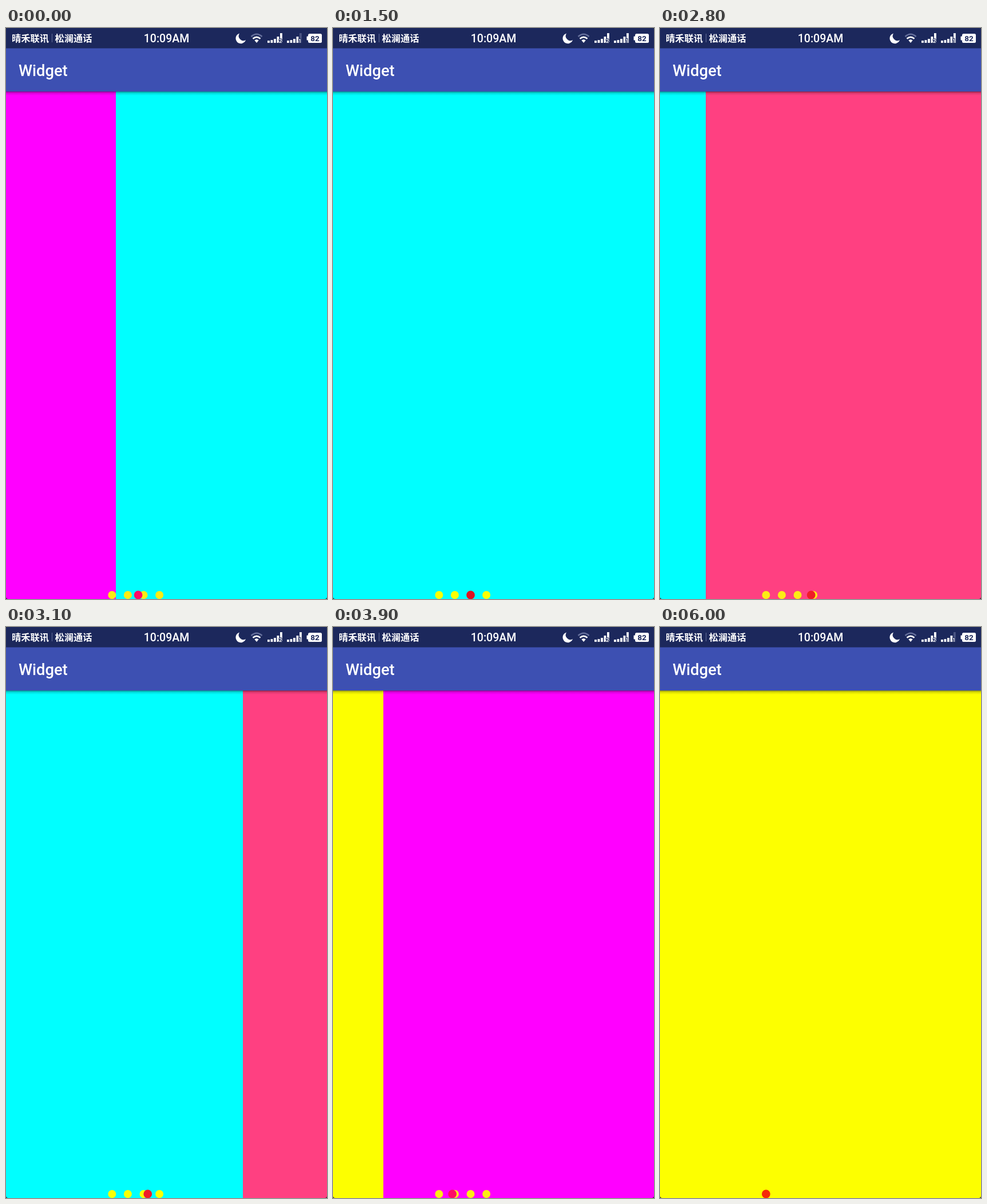
These frames come from a looping animation (561x998 px, 6100 ms). An HTML page:

```html
<!DOCTYPE html>
<html lang="zh">
<head>
<meta charset="utf-8">
<style>
  html, body { margin: 0; width: 100%; height: 100%; overflow: hidden; background: #222; }
  svg { display: block; width: 561px; height: 998px; border-radius: 4px; }
  text { font-family: Roboto, "Noto Sans CJK SC", "Noto Sans CJK", sans-serif; font-weight: 500; fill: #fff; }
  .carrier { font-family: "Noto Sans CJK SC", "Noto Sans CJK", sans-serif; font-size: 16.25px; font-weight: 700; }
  .sim { font-size: 9px; font-weight: 700; stroke: #1c285c; stroke-width: 2px; paint-order: stroke; }
</style>
</head>
<body>
<svg viewBox="0 0 561 998">
  <defs>
    <linearGradient id="shade" x2="0" y2="1">
      <stop stop-color="#000" stop-opacity=".45"/>
      <stop offset=".4" stop-color="#000" stop-opacity=".14"/>
      <stop offset="1" stop-color="#000" stop-opacity="0"/>
    </linearGradient>
  </defs>
  <g id="pages"></g>
  <g id="dots"></g>
  <circle id="marker" cy="991" r="7.4"/>
  <rect y="111" width="561" height="7" fill="url(#shade)"/>
  <rect width="561" height="111" fill="#3d50b2"/>
  <rect width="561" height="35.5" fill="#1c285c"/>
  <text x="22" y="84" font-size="27.3">Widget</text>

  <text class="carrier" x="10" y="24">晴禾联讯</text>
  <path d="M80.5 10V25" stroke="#66709c"/>
  <text class="carrier" x="85.5" y="24">松澜通话</text>
  <text x="280.5" y="25" font-size="19.5" text-anchor="middle">10:09AM</text>
  <path d="M408 9.5A9 9 0 1 0 419 21A8.2 8.2 0 0 1 408 9.5Z" fill="#fff"/>
  <g fill="none" stroke="#fff" stroke-width="2.6">
    <path d="M428.5 15Q438 6.5 447.5 15" stroke="#66709c"/>
    <path d="M431.5 18.8Q438 13 444.5 18.8"/>
  </g>
  <path d="M434.3 21.5Q438 18.5 441.7 21.5L438 26Z" fill="#fff"/>
  <g id="signals" fill="#fff"></g>
  <text class="sim" x="477" y="26">2</text>
  <text class="sim" x="511" y="26">1</text>
  <rect x="528" y="10" width="24" height="16" rx="2.5" fill="#fff"/>
  <rect x="525.5" y="14.5" width="4" height="7" rx="1" fill="#fff"/>
  <text x="540" y="23" font-size="13.5" text-anchor="middle" style="fill:#1c285c;font-weight:700">82</text>
</svg>
<script>
const LOOP = 6100, STEP = 100, WIDTH = 561;
const DOT_X = 185.3, DOT_GAP = 27.6;
const colors = ['#fdff00', '#f0f', '#0ff', '#ff4081'];

// Swipes: [time in ms, page reached]
const swipes = [
  [-259, 2], [400, 1], [500, 1], [850, 0], [1170, 1], [1500, 2], [1600, 2],
  [2050, 3], [2480, 2], [2900, 3], [3201, 2], [3662, 1], [3700, 1], [4500, 0],
  [4880, 1], [5250, 2], [5620, 1], [6000, 0], [LOOP, 0]
];

const $ = id => document.getElementById(id);

function add(parent, tag, attrs) {
  const el = document.createElementNS('http://www.w3.org/2000/svg', tag);
  for (const key in attrs) el.setAttribute(key, attrs[key]);
  return parent.appendChild(el);
}

colors.forEach((fill, i) => {
  add($('pages'), 'rect', { x: i * WIDTH, y: 111, width: WIDTH, height: 887, fill });
  add($('dots'), 'circle', { cx: DOT_X + i * DOT_GAP, cy: 991, r: 7 });
});

function signal(x) {
  let bar;
  [4, 5, 7, 11, 17].forEach((height, i) => {
    bar = add($('signals'), 'rect', { x: x + i * 5.5, y: 26 - height, width: 3.8, height });
  });
  return bar;
}
signal(457);
const weakBar = signal(491);

function pageAt(t) {
  const i = swipes.findIndex(([time]) => time > t);
  const [t0, p0] = swipes[i - 1], [t1, p1] = swipes[i];
  const u = (t - t0) / (t1 - t0);
  return p0 + (p1 - p0) * u * u * (3 - 2 * u);
}

function markerColor(page) {
  if (page < 0.05) return '#f62a08';
  if (page < 1.98) return '#ff0a66';
  return page < 2.02 ? '#e01020' : '#f01c28';
}

function draw(now) {
  const t = Math.floor(now % LOOP / STEP) * STEP;
  const page = pageAt(t);
  const plain = page < 0.05 || (page > 1.98 && page < 2.5);
  $('pages').setAttribute('transform', `translate(${-Math.round(page * WIDTH)})`);
  $('dots').setAttribute('fill', plain ? colors[0] : '#fcec14');
  $('marker').setAttribute('cx', DOT_X + page * DOT_GAP);
  $('marker').setAttribute('fill', markerColor(page));
  weakBar.setAttribute('fill', t > 1000 && t < 4200 ? '#fff' : '#4a5482');
}

const start = performance.now();
function tick() {
  draw(performance.now() - start);
  requestAnimationFrame(tick);
}
tick();
</script>
</body>
</html>
```
